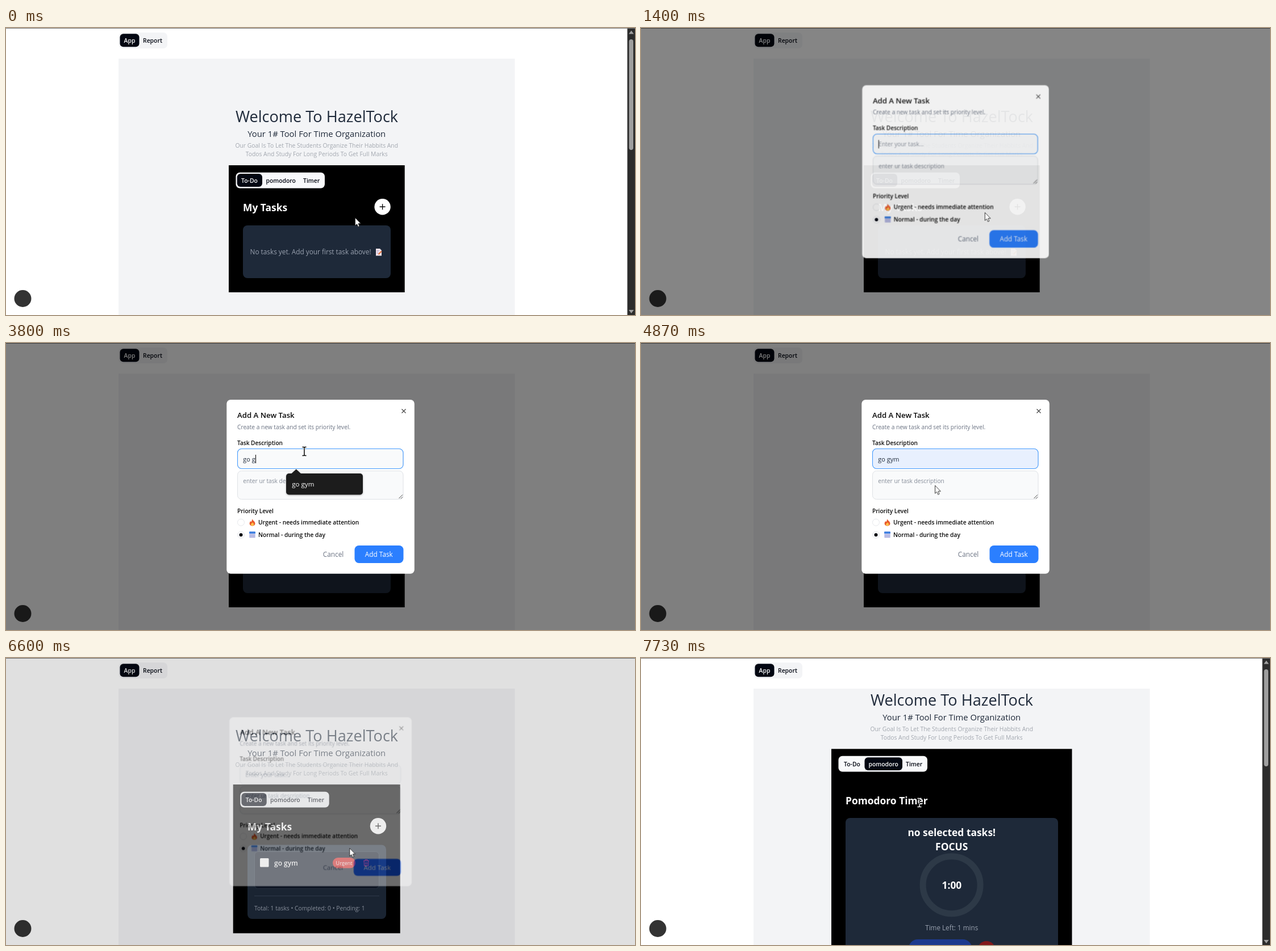
An HTML page for the animation above (8 s loop, 1107 px wide and 506 px high).

```html
<!DOCTYPE html>
<html lang="en">
<head>
<meta charset="utf-8">
<title>Task planner</title>
<style>
html, body { margin: 0; width: 100%; height: 100%; overflow: hidden; background: #fff; }
svg { display: block; width: 1107px; height: 506px; font-family: "Open Sans", "Noto Sans", sans-serif; }
text { white-space: pre; }
.mid { text-anchor: middle; }
.tab { font-size: 10.4px; font-weight: 600; }
.h2 { font-size: 17.4px; font-weight: 700; fill: #fff; }
.label { font-size: 10.1px; font-weight: 600; fill: #0a0a0a; }
.opt { font-size: 10.25px; font-weight: 600; fill: #0a0a0a; }
.muted { fill: #99a1af; }
.hint { font-size: 10.2px; fill: #858c98; }
.ink { fill: #030712; }
.panel { fill: #1e2939; }

/* hard switches on one shared 8 s clock */
.sw { animation: 8s step-end infinite; }
.empty { animation-name: empty; }
.tasks { animation-name: tasks; }
.pomo { animation-name: pomo; }
.short { animation-name: short; }
.hero { animation-name: hero; }
.bar { animation-name: bar; }
.plus { animation-name: plus; }
.place { animation-name: place; }
.k1 { animation-name: k1; }
.k2 { animation-name: k2; }
.k3 { animation-name: k3; }
.k4, .filled { animation-name: filled; }
.focus { animation-name: focus; }
.pop { animation-name: pop; }
.item { animation-name: item; }
.normal { animation-name: normal; }
.urgent { animation-name: urgent; }
.add { animation-name: add; }
.caret { animation-name: caret, caretx; }

@keyframes empty { 0% { opacity: 1 } 82.4%, 100% { opacity: 0 } }
@keyframes tasks { 0% { opacity: 0 } 82.4% { opacity: 1 } 93.3%, 100% { opacity: 0 } }
@keyframes pomo { 0% { opacity: 0 } 93.3%, 100% { opacity: 1 } }
@keyframes short { 0% { opacity: 1 } 93.3%, 100% { opacity: 0 } }
@keyframes hero {
  0% { transform: none }
  82.4% { transform: translateY(-19px) }
  93.3%, 100% { transform: translateY(-82px) }
}
@keyframes bar { 0% { opacity: 1 } 16.6% { opacity: 0 } 84.1%, 100% { opacity: 1 } }
@keyframes plus { 0% { fill: #fff } 15.8% { fill: #f3f4f6 } 16.6%, 100% { fill: #fff } }
@keyframes place { 0% { opacity: 1 } 40.8% { opacity: 0 } 82.4%, 100% { opacity: 1 } }
@keyframes k1 { 0% { fill-opacity: 0 } 40.8% { fill-opacity: 1 } 82.4%, 100% { fill-opacity: 0 } }
@keyframes k2 { 0% { fill-opacity: 0 } 42.45% { fill-opacity: 1 } 82.4%, 100% { fill-opacity: 0 } }
@keyframes k3 { 0% { fill-opacity: 0 } 47.45% { fill-opacity: 1 } 82.4%, 100% { fill-opacity: 0 } }
@keyframes filled { 0% { fill-opacity: 0 } 57.45% { fill-opacity: 1 } 82.4%, 100% { fill-opacity: 0 } }
@keyframes focus { 0% { opacity: 1 } 70.8%, 100% { opacity: 0 } }
@keyframes pop { 0% { opacity: 0 } 42.45% { opacity: 1 } 60.8%, 100% { opacity: 0 } }
@keyframes item { 0% { opacity: 0 } 57.45% { opacity: 1 } 60.8%, 100% { opacity: 0 } }
@keyframes normal { 0% { opacity: 1 } 70.8% { opacity: 0 } 82.4%, 100% { opacity: 1 } }
@keyframes urgent { 0% { opacity: 0 } 70.8% { opacity: 1 } 82.4%, 100% { opacity: 0 } }
@keyframes add { 0% { fill: #2b7fff } 77.5%, 100% { fill: #155dfc } }
@keyframes caret {
  0% { opacity: 0 } 16.6% { opacity: 1 } 23.3% { opacity: 0 } 30% { opacity: 1 }
  36.6% { opacity: 0 } 40.8% { opacity: 1 } 55%, 100% { opacity: 0 }
}
@keyframes caretx {
  0% { transform: none }
  40.8% { transform: translateX(6px) }
  42.45% { transform: translateX(12.3px) }
  44.95% { transform: translateX(15.7px) }
  47.45%, 100% { transform: translateX(22px) }
}

.shade { animation: shade 8s linear infinite; }
@keyframes shade {
  0%, 16.6% { opacity: 0 } 16.61% { opacity: .2 } 17.5% { opacity: .48 }
  18.2%, 82.4% { opacity: .5 } 82.41%, 82.5% { opacity: .122 } 83.5%, 100% { opacity: 0 }
}
.dialog { transform-origin: 553.5px 253.5px; animation: dialog 8s linear infinite; }
@keyframes dialog {
  0%, 16.6% { opacity: 0; transform: scale(.95) }
  16.61% { opacity: .3; transform: scale(.965) }
  17.5% { opacity: .89; transform: scale(.994) }
  18.6%, 82.4% { opacity: 1; transform: none }
  82.41%, 82.5% { opacity: .42; transform: scale(.971) }
  84.1%, 100% { opacity: 0; transform: scale(.95) }
}

.arrow { animation: move 8s linear infinite, arrow 8s step-end infinite; }
.beam { mix-blend-mode: difference; animation: move 8s linear infinite, beam 8s step-end infinite; }
@keyframes arrow {
  0% { opacity: 1 } 22.5% { opacity: 0 } 56.6% { opacity: 1 }
  61.6% { opacity: 0 } 65% { opacity: 1 } 94.1%, 100% { opacity: 0 }
}
@keyframes beam {
  0% { opacity: 0 } 22.5% { opacity: 1 } 56.6% { opacity: 0 }
  61.6% { opacity: 1 } 65% { opacity: 0 } 94.1%, 100% { opacity: 1 }
}
@keyframes move {
  0%, 4.1% { transform: translate(614px, 334px) }
  7% { transform: translate(636px, 357px) }
  10% { transform: translate(664px, 361px) }
  12.5% { transform: translate(671px, 340px) }
  14.1%, 15.9% { transform: translate(669px, 322px) }
  17.5% { transform: translate(605px, 325px) }
  20% { transform: translate(560px, 300px) }
  22.5% { transform: translate(522px, 268px) }
  25%, 27.6% { transform: translate(504px, 250px) }
  30.5% { transform: translate(516px, 214px) }
  33.3%, 54.2% { transform: translate(525px, 191px) }
  58.3%, 60% { transform: translate(522px, 245px) }
  65% { transform: translate(494px, 277px) }
  69%, 71.7% { transform: translate(455px, 315px) }
  75.5% { transform: translate(570px, 350px) }
  79.1%, 81.6% { transform: translate(650px, 368px) }
  82.4%, 82.5% { transform: translate(604.5px, 335px) }
  87% { transform: translate(530px, 284px) }
  92.5%, 100% { transform: translate(490px, 255px) }
}
</style>
</head>
<body>
<svg viewBox="0 0 1107 506">
  <defs>
    <g id="tabs">
      <rect x="404.5" y="254.8" width="156.5" height="27.8" rx="7" fill="#f8f9fb"/>
      <g class="tab ink">
        <text class="mid" x="428.5" y="272.7">To-Do</text>
        <text class="mid" x="483.7" y="272.7">pomodoro</text>
        <text class="mid" x="537.7" y="272.7">Timer</text>
      </g>
    </g>
    <g id="todo">
      <use href="#tabs"/>
      <rect class="ink" x="406.7" y="257" width="44.3" height="23" rx="6"/>
      <text class="tab mid" x="428.5" y="272.7" fill="#fff">To-Do</text>
    </g>
    <path id="cross" d="M-5 0H5M0 -5V5" stroke="#0a0a0a" stroke-width="1.4"/>
    <filter id="soft" x="-20%" y="-20%" width="140%" height="140%">
      <feDropShadow dx="0" dy="1" stdDeviation="1.5" flood-opacity=".3"/>
    </filter>
  </defs>

  <rect width="1107" height="506" fill="#fff"/>
  <rect x="198" y="54" width="697.5" height="452" fill="#f3f4f6"/>
  <rect x="198.5" y="8" width="85.5" height="28" rx="7" fill="#f3f4f6"/>
  <rect class="ink" x="200.5" y="10.3" width="34" height="22.9" rx="6"/>
  <text class="tab mid" x="217.5" y="25.8" fill="#fff">App</text>
  <text class="tab mid ink" x="258" y="25.8">Report</text>

  <g class="sw hero mid" fill="#1e2939">
    <text x="547" y="166" font-size="27.1">Welcome To HazelTock</text>
    <text x="546.7" y="192" font-size="14.8">Your 1# Tool For Time Organization</text>
    <g font-size="10.35" fill="#a3a8b0">
      <text x="546.7" y="210.6">Our Goal Is To Let The Students Organize Their Habbits And</text>
      <text x="546.7" y="226.2">Todos And Study For Long Periods To Get Full Marks</text>
    </g>
  </g>

  <g class="sw empty">
    <rect x="392" y="242" width="309.7" height="224"/>
    <use href="#todo"/>
    <text class="h2" x="417" y="322.5">My Tasks</text>
    <circle class="sw plus" cx="662.6" cy="315.2" r="14.2"/>
    <use href="#cross" x="662.6" y="315.2"/>
    <rect class="panel" x="417" y="348" width="260" height="93" rx="8"/>
    <text class="muted" x="429.5" y="399.2" font-size="11.8">No tasks yet. Add your first task above!</text>
    <path d="M651 389h7l3 3v9.5h-10z" fill="#f1e4ea"/>
    <path d="M652.5 392.5h4M652.5 395h3M652.5 397.5h3" stroke="#a58fc0" stroke-width=".8"/>
    <path d="M655.5 399l5.5-5.5" stroke="#e0703c" stroke-width="2.2"/>
  </g>

  <g class="sw tasks">
    <rect x="399.7" y="223" width="294" height="262.3"/>
    <use href="#todo" x="7.7" y="-19"/>
    <text class="h2" x="425" y="303.5">My Tasks</text>
    <circle cx="655" cy="296.2" r="14.2" fill="#fff"/>
    <use href="#cross" x="655" y="296.2"/>
    <rect class="panel" x="425" y="329.5" width="244" height="130.5" rx="8"/>
    <rect x="437.5" y="341.5" width="219" height="65" rx="6" fill="#101828" stroke="#2c3748"/>
    <rect x="447" y="353" width="15.5" height="15.5" rx="1.5" fill="#fff"/>
    <text x="472" y="365.5" font-size="12" font-weight="600" fill="#fff">go gym</text>
    <rect x="575" y="352" width="40" height="18.5" rx="9.2" fill="#dc2626"/>
    <text class="mid" x="595" y="364.5" font-size="9" fill="#fff">Urgent</text>
    <path d="M629 357.5h10M632 357.5v-2h4v2M630 357.5l.6 9h6.8l.6-9M632.8 360v4.5M635.2 360v4.5" fill="none" stroke="#fb2c36"/>
    <path d="M437 419.5H657" stroke="#364153"/>
    <text class="muted" x="437" y="444.5" font-size="10.3">Total: 1 tasks • Completed: 0 • Pending: 1</text>
  </g>

  <g class="sw pomo">
    <rect x="335" y="160.3" width="423.5" height="346"/>
    <use href="#tabs" x="-57" y="-82"/>
    <rect class="ink" x="393.5" y="175.2" width="66.5" height="22.9" rx="6"/>
    <text class="tab mid" x="426.7" y="190.7" fill="#fff">pomodoro</text>
    <text class="h2" x="360" y="258.3">Pomodoro Timer</text>
    <rect class="panel" x="360" y="282" width="374" height="240" rx="8"/>
    <g class="h2 mid">
      <text x="546.7" y="314.3">no selected tasks!</text>
      <text x="546.7" y="338.8">FOCUS</text>
      <text x="546.9" y="407.3">1:00</text>
    </g>
    <circle cx="546.6" cy="400.2" r="50.5" fill="none" stroke="#2d3947" stroke-width="11"/>
    <text class="muted mid" x="546.7" y="479.5" font-size="11.7">Time Left: 1 mins</text>
    <rect x="471" y="496" width="111.5" height="32" rx="16" fill="#1c398e"/>
    <circle cx="608" cy="514.5" r="15.5" fill="#82181a"/>
  </g>

  <g class="sw bar">
    <rect x="1093.5" width="13.5" height="506" fill="#2c2c2c"/>
    <g fill="#9f9f9f">
      <path d="M1096 10.5h9l-4.5-6zM1096 497h9l-4.5 6z"/>
      <rect class="sw short" x="1096.5" y="20" width="7.5" height="195" rx="3.7"/>
      <rect class="sw pomo" x="1096.5" y="20" width="7.5" height="171" rx="3.7"/>
    </g>
  </g>
  <rect width="1107" height="1" fill="#777"/>

  <rect class="shade" width="1107" height="506"/>
  <circle cx="29.5" cy="477" r="15" fill="#000" fill-opacity=".8"/>

  <g class="dialog">
    <rect x="388.3" y="100" width="330.5" height="306.7" rx="7" fill="#fff"/>
    <text x="407" y="132" font-size="13.2" font-weight="600" fill="#0a0a0a">Add A New Task</text>
    <text class="hint" x="407" y="151.5" style="fill:#6a7282">Create a new task and set its priority level.</text>
    <path d="M696.5 116.5l7 7M703.5 116.5l-7 7" stroke="#444" stroke-width="1.2"/>

    <text class="label" x="407" y="179.7">Task Description</text>
    <g fill="#f9fafb" stroke="#dfe2e6">
      <rect x="407.5" y="186.5" width="291.5" height="35" rx="7"/>
      <rect x="407.5" y="225.5" width="291.5" height="50" rx="7"/>
    </g>
    <rect class="sw filled" x="408" y="187" width="290.5" height="34" rx="6.5" fill="#e8f0fe"/>
    <rect class="sw focus" x="407.5" y="186.5" width="291.5" height="35" rx="7" fill="none" stroke="#459cff" stroke-width="1.1"/>
    <text class="hint sw place" x="417.3" y="208.5">Enter your task...</text>
    <text x="417.3" y="208.8" font-size="10.9" fill="#1e2939"><tspan class="sw k1">g</tspan><tspan class="sw k2">o</tspan> <tspan class="sw k3">g</tspan><tspan class="sw k4">ym</tspan></text>
    <rect class="sw caret" x="417" y="197" width="1" height="15"/>
    <text class="hint" x="417.3" y="246.8">enter ur task description</text>
    <path d="M691.5 274l6.5-6.5M695 274.5l3-3" stroke="#444"/>

    <text class="label" x="407" y="300.2">Priority Level</text>
    <g fill="#fff" stroke="#e5e7eb">
      <circle cx="413.5" cy="316.3" r="6"/>
      <circle cx="413.5" cy="338.2" r="6"/>
    </g>
    <circle class="sw urgent ink" cx="413.5" cy="316.3" r="3"/>
    <circle class="sw normal ink" cx="413.5" cy="338.2" r="3"/>
    <path d="M433 310c1 3 5.5 4.5 5.5 8.3 0 2.5-2 4.2-4.9 4.2s-5-1.7-5-4.3c0-1.8 1-2.8 1.5-4.2l1.4 1.5c.9-1.5 1.8-3.2 1.5-5.5z" fill="#e8592b"/>
    <path d="M434 316c.5 1.5 2.3 2 2.3 3.9 0 1.4-1 2.3-2.6 2.3s-2.7-.9-2.7-2.3c0-1.7 2.3-2 3-3.9z" fill="#fcc04a"/>
    <rect x="428" y="332.5" width="11" height="11" rx="1" fill="#c9cdf0"/>
    <rect x="428" y="332.5" width="11" height="3.5" rx="1" fill="#3c7fe0"/>
    <path d="M429.5 338h8M429.5 340.2h8M429.5 342.3h8" stroke="#8f8fc4" stroke-dasharray="1.4 .8"/>
    <text class="opt" x="444" y="319.9">Urgent - needs immediate attention</text>
    <text class="opt" x="444" y="341.9">Normal - during the day</text>

    <text class="mid" x="576" y="377.3" font-size="11.8" fill="#6a7282">Cancel</text>
    <rect class="sw add" x="613.5" y="357" width="86" height="31" rx="7.5"/>
    <text class="mid" x="656.3" y="377.3" font-size="11.8" fill="#fff">Add Task</text>

    <g class="sw pop">
      <g fill="#1f1f1f" filter="url(#soft)">
        <path d="M502 230.5l8.7-8 8.7 8z"/>
        <rect x="493" y="230" width="135" height="37.5" rx="5"/>
      </g>
      <rect class="sw item" x="493" y="236.5" width="135" height="25.5" fill="#3c3c3c"/>
      <text x="503.3" y="253" font-size="11.5" fill="#fff">go gym</text>
    </g>
  </g>

  <path class="arrow" d="M.5 .5V14.5L3.6 11.7 5.7 16.5 8 15.5 6 10.8H10.3Z" fill="#fff" stroke="#222" stroke-width=".9"/>
  <path class="beam" d="M-3.5 -7.5H-1Q0 -7.5 0 -6.5Q0 -7.5 1 -7.5H3.5M0 -6.5V6.5M-3.5 7.5H-1Q0 7.5 0 6.5Q0 7.5 1 7.5H3.5" fill="none" stroke="#fff" stroke-width="1.5"/>
</svg>
</body>
</html>
```
